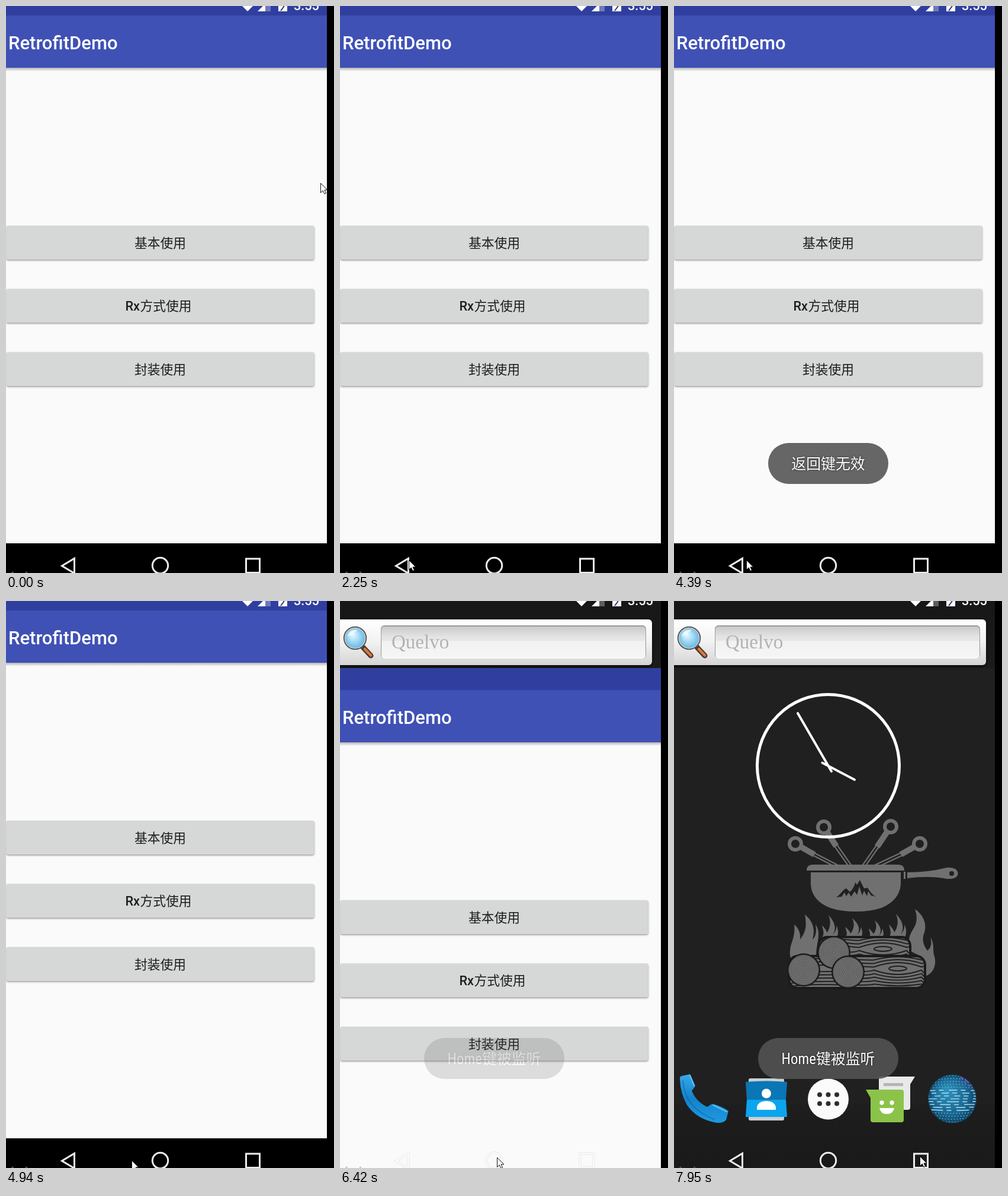
Animation of 554 by 955 pixels, one loop 8 s. Source, as an HTML page with a canvas:

```html
<!DOCTYPE html>
<html lang="zh">
<head>
<meta charset="utf-8">
<title>RetrofitDemo</title>
<style>
html, body { margin: 0; width: 100%; height: 100%; overflow: hidden; background: #000; }
canvas { display: block; }
</style>
</head>
<body>
<canvas id="stage" width="554" height="955"></canvas>
<script>
const stage = document.getElementById('stage').getContext('2d');
let ctx = stage;
const LOOP = 8000, W = 542, H = 955, MID = 260.5;
const ROBOTO = 'Roboto, "Noto Sans CJK SC", "Noto Sans CJK", sans-serif';
const CJK = '"Noto Sans CJK SC", "Noto Sans CJK", sans-serif';
const CONDENSED = '"Roboto Condensed", ' + ROBOTO;
const ART = '#707070', DARK = '#202020';

// Timelines hold [start ms, values...]; each value stays until the next one.
const CURSOR = [
  [0, 531, 298], [150, 514, 298], [300, 473, 448], [420, 415, 560], [550, 362, 661],
  [670, 292, 792], [820, 235, 880], [940, 177, 927], [1250, 163, 926], [1400, 146, 925],
  [1830, 136, 928], [1950, 130, 930], [2100, 117, 933], [2250, 116, 933], [4390, 122, 933],
  [4540, 140, 934], [4670, 162, 935], [4810, 190, 940], [4940, 212, 942], [5080, 230, 942],
  [5210, 248, 941], [5330, 261, 940], [5480, 265, 937], [7530, 330, 938], [7650, 398, 935],
  [7800, 414, 935], [7950, 415, 935]
];
const BACK_TOAST = [[0, 0], [2520, .2], [2640, .65], [2790, .92], [2940, 1],
  [4540, .85], [4670, .55], [4810, .2], [4940, 0]];
const HOME_TOAST = [[0, 0], [6420, .2], [6570, .69], [6720, .93], [6840, 1]];
const BACK_RIPPLE = [[0, 0], [2520, .14], [2640, .2], [2790, .08], [2940, 0]];
const HOME_RIPPLE = [[0, 0], [5880, .12], [6000, .2], [6150, .16], [6300, .06], [6420, 0]];
const APP_SHIFT = [[0, 0], [6300, 18], [6420, 134], [6570, H]];

const FLAME = new Path2D('M-50 0C-20 -25 -40 -40 -42 -58C-25 -45 -15 -35 -12 -28C8 -50 12 -75 -4 -100' +
  'C45 -65 40 -35 22 -20C38 -30 45 -42 45 -58C62 -30 50 -10 40 0Z');

function at(track, t) {
  let now = track[0];
  for (const key of track) if (key[0] <= t) now = key;
  return now.slice(1);
}

function rect(x, y, w, h, color) {
  ctx.fillStyle = color;
  ctx.fillRect(x, y, w, h);
}

function round(x, y, w, h, r, color) {
  ctx.fillStyle = color;
  ctx.beginPath();
  ctx.roundRect(x, y, w, h, r);
  ctx.fill();
}

function disc(x, y, r, color) {
  ctx.fillStyle = color;
  ctx.beginPath();
  ctx.arc(x, y, r, 0, 7);
  ctx.fill();
}

function ring(x, y, r, width, color) {
  ctx.strokeStyle = color;
  ctx.lineWidth = width;
  ctx.beginPath();
  ctx.arc(x, y, r, 0, 7);
  ctx.stroke();
}

function fill(d, color) {
  ctx.fillStyle = color;
  ctx.fill(new Path2D(d));
}

function stroke(d, width, color) {
  ctx.strokeStyle = color;
  ctx.lineWidth = width;
  ctx.stroke(new Path2D(d));
}

function text(str, x, y, font, color, align = 'left') {
  ctx.font = font;
  ctx.fillStyle = color;
  ctx.textAlign = align;
  ctx.fillText(str, x, y);
}

function fade(y0, y1, ...colors) {
  const g = ctx.createLinearGradient(0, y0, 0, y1);
  colors.forEach((c, i) => g.addColorStop(i / (colors.length - 1), c));
  return g;
}

function withShadow(color, blur, dy, draw) {
  ctx.save();
  ctx.shadowColor = color;
  ctx.shadowBlur = blur;
  ctx.shadowOffsetY = dy;
  draw();
  ctx.restore();
}

// Runs draw on its own canvas, so the result can be blended as one layer.
function layer(draw) {
  const canvas = document.createElement('canvas');
  canvas.width = 554;
  canvas.height = H;
  ctx = canvas.getContext('2d');
  draw();
  ctx = stage;
  return canvas;
}

function drawButton(y) {
  withShadow('rgba(0,0,0,.4)', 3, 1.5, () => round(.5, y, 520, 57, 3, '#d6d7d7'));
}

function drawApp(dy) {
  ctx.save();
  ctx.translate(0, dy);
  rect(0, 104, W, H, '#fafafa');
  rect(0, 104, W, 6, fade(104, 110, 'rgba(0,0,0,.28)', 'rgba(0,0,0,0)'));
  rect(0, -21, W, 38, '#303f9f');
  rect(0, 16, W, 88, '#3f51b5');
  text('RetrofitDemo', 4, 72.5, `500 31.1px ${ROBOTO}`, '#fff');
  for (let i = 0; i < 3; i++) drawButton(370 + i * 106.5);
  const font = `21.75px ${CJK}`, ink = '#1c1c1c';
  text('基本使用', MID, 407, font, ink, 'center');
  text('Rx', 201.5, 513, `500 21.75px ${ROBOTO}`, ink);
  text('方式使用', 226.5, 513, font, ink);
  text('封装使用', MID, 620, font, ink, 'center');
  ctx.restore();
}

function drawStatus() {
  fill('M399 0H417L408 9Z', '#fff');
  fill('M425 9L447 -13V9Z', 'rgba(255,255,255,.3)');
  fill('M425 9L438 -4V9Z', '#fff');
  rect(460, -10, 15, 19, '#fff');
  stroke('M464 8L470 0', 2, '#333a70');
  text('3:55', 486, 7, `500 21.75px ${ROBOTO}`, '#fff');
}

function drawNav(color, width) {
  ctx.lineJoin = 'miter';
  stroke('M94.5 943L115.5 930.5V955.5Z', width, color);
  ring(MID, 942.5, 13.2, width, color);
  stroke('M405.5 931H428.5V954.5H405.5Z', width, color);
}

function drawRipple(x, alpha) {
  if (alpha) round(x - 84, 909, 168, 68, 34, `rgba(255,255,255,${alpha})`);
}

function drawSearch() {
  withShadow('rgba(0,0,0,.8)', 5, 2, () =>
    round(-12, 31, 539, 77, 6, fade(31, 108, '#fff', '#f2f2f2', '#d4d4d4')));
  round(69, 41, 448, 56, 6, '#9c9c9c');
  round(70, 43, 446, 54, 5, fade(43, 97, '#c9c9c9', '#e4e4e4', '#e9e9e9', '#fafafa'));
  rect(71, 67, 444, 24, fade(67, 91, '#f1f1f1', '#f5f5f5'));
  text('Quelvo', 87, 80, '33px "Liberation Serif", serif', '#b3b3b3');
  ctx.lineCap = 'round';
  stroke('M38 77L52 92', 9, '#4b3a32');
  stroke('M42 81L52 91.5', 4.5, '#d9793c');
  const g = ctx.createRadialGradient(21, 56, 2, 25.5, 62.5, 19);
  g.addColorStop(0, '#e2f7ff');
  g.addColorStop(1, '#58b4e6');
  disc(25.5, 62.5, 17, g);
  ring(25.5, 62.5, 18, 3.5, '#55595c');
  ring(25.5, 62.5, 17, 1.5, '#d5dce0');
  fill('M13 59.5Q16 47.5 30 48.5Q22 56.5 13 59.5Z', 'rgba(255,255,255,.65)');
}

function drawClock() {
  ring(MID, 277.5, 120, 5, '#fff');
  ctx.lineCap = 'round';
  stroke('M266 287L209 189M250.5 272.5L305 301', 4, '#fff');
}

function drawSkewer(x, y, gx, gy, px, py) {
  ctx.lineCap = 'butt';
  const line = `M${gx} ${gy}L${px} ${py}`;
  stroke(line, 7, ART);
  stroke(line, 2.5, DARK);
  stroke(`M${x} ${y}L${gx} ${gy}`, 10, ART);
  disc(x, y, 13, ART);
  disc(x, y, 7, DARK);
}

function drawPot() {
  drawSkewer(205, 409, 237, 427, 276, 447);
  drawSkewer(253, 381, 274, 413, 298, 447);
  drawSkewer(366, 380, 343, 414, 320, 447);
  drawSkewer(415, 409, 383, 427, 340, 447);
  fill('M224 454Q224 444 234 444H379Q389 444 389 454Z', ART);
  fill('M231 457H383V478Q380 505 350 517Q332 523 307 523Q282 523 264 517Q233 505 231 478Z', ART);
  fill('M388 456H391V468H388ZM394 457Q430 457 461 449Q479 448 479.5 459Q479 469 461 468Q430 462 394 467Z', ART);
  disc(469, 459, 4, DARK);
  fill('M274 499C282 494 285 486 291 484L297 490Q304 484 306 474L309 478L314 470L321 484L327 483' +
    'Q333 494 341 498L333 496L328 489L326 497L321 488L318 496L313 481L309 495L305 489L299 498' +
    'L295 491L291 497L288 491L283 498Z', DARK);
}

function drawFlame(x, base, w, h) {
  ctx.save();
  ctx.translate(x, base);
  ctx.scale(w / 100, h / 100);
  ctx.fillStyle = ART;
  ctx.fill(FLAME);
  ctx.restore();
}

function drawLog(x, y, w, h, eyeX, eyeY) {
  round(x - 4, y - 4, w + 8, h + 8, 17, '#1b1b1b');
  ctx.save();
  ctx.beginPath();
  ctx.roundRect(x, y, w, h, 13);
  ctx.clip();
  rect(x, y, w, h, ART);
  ctx.strokeStyle = DARK;
  ctx.lineWidth = 2;
  for (let i = -5; i <= 5; i++) {
    if (!i) continue;
    const v = eyeY + i * 5.5, bulge = Math.sign(i) * (8 - Math.abs(i));
    ctx.beginPath();
    ctx.moveTo(x, v + 3);
    ctx.bezierCurveTo(x + w * .25, v - 5, eyeX - 55, v + 4, eyeX - 40, v - bulge * .4);
    ctx.bezierCurveTo(eyeX - 12, v + bulge, eyeX + 12, v + bulge, eyeX + 40, v - bulge * .4);
    ctx.lineTo(x + w, v + 2);
    ctx.stroke();
  }
  ctx.beginPath();
  ctx.ellipse(eyeX, eyeY, 15, 4, 0, 0, 7);
  ctx.stroke();
  ctx.restore();
}

function drawLogEnd(x, y) {
  disc(x, y, 28, '#1b1b1b');
  disc(x, y, 25.5, ART);
  for (let r = 3; r < 25; r += 3) ring(x, y, r, .9, '#555');
}

function drawFire() {
  fill('M197 602C192 578 206 572 203 545C212 552 214 562 213 570C224 556 224 545 221 528' +
    'C237 541 238 556 234 570C240 565 241 556 239 545C250 560 240 575 240 600Z', ART);
  fill('M400 590C393 572 399 560 405 551C411 541 411 531 407 519C423 530 427 546 423 558' +
    'C418 570 421 579 428 589C434 584 436 577 433 567C440 575 437 588 439 596' +
    'C445 612 438 628 424 632L420 600Z', ART);
  drawFlame(262, 570, 28, 41);
  drawFlame(302, 570, 30, 36);
  drawFlame(340, 570, 26, 32);
  drawFlame(376, 570, 30, 43);
  drawLog(246, 568, 151, 42, 353, 586);
  drawLog(196, 600, 226, 50, 378, 619);
  drawLogEnd(270, 592);
  drawLogEnd(219, 621.5);
  drawLogEnd(294, 625);
}

function drawPhone() {
  fill('M10 806Q9 801 13 800L27 797L36 817L30 825Q37 843 56 852L64 847Q78 849 92 859L88 874' +
    'Q82 881 68 878Q38 872 22 849Q11 830 10 806Z', fade(797, 880, '#35a9ea', '#1382cb', '#209be2'));
  stroke('M15 808Q18 854 68 873', 2, 'rgba(8,90,150,.45)');
  stroke('M27 799L34 816M66 849L89 860', 2, '#62c3f5');
}

function drawContacts() {
  round(126, 804, 60, 71, 3, '#c9ced1');
  fill('M121 810Q156 807 191 810L189 840H123Z', '#0a76b5');
  fill('M123 840H189L191 869H121Z', '#0ba5ee');
  disc(156, 829.5, 8, '#fff');
  fill('M140 857V852Q143 842 156 842Q169 842 172 852V857Z', '#fff');
}

function drawDrawer() {
  disc(MID, 839, 34.5, '#fafafa');
  for (let i = 0; i < 6; i++) disc(246 + i % 3 * 14.5, 831.5 + (i > 2) * 15, 4, '#2c2c2c');
}

function drawMessages() {
  fill('M349 801H407L399 814V853Q399 857 395 857H349Q346 857 346 853V804Q346 801 349 801Z', '#e9e9e9');
  rect(354, 812, 33, 5, '#b5b5b5');
  fill('M324 823H384Q388 823 388 827V874Q388 878 384 878H336Q332 878 332 874V837Z', '#8bc34a');
  disc(351, 845, 3.7, '#fff');
  disc(368, 845, 3.7, '#fff');
  fill('M347 854H372Q370 864 359.5 864Q349 864 347 854Z', '#fff');
}

function drawGlobe() {
  const x = 470, y = 838.5, r = 41;
  const g = ctx.createRadialGradient(460, 824, 4, x, y, r);
  g.addColorStop(0, '#2d8fbb');
  g.addColorStop(.7, '#1a6690');
  g.addColorStop(1, '#104463');
  disc(x, y, r, g);
  ctx.save();
  ctx.beginPath();
  ctx.arc(x, y, r - 1, 0, 7);
  ctx.clip();
  ctx.lineCap = 'butt';
  for (let i = -8; i <= 8; i++) {
    const v = y + i * 4.6, half = Math.sqrt(Math.max(0, r * r - (v - y) ** 2));
    const bright = i > -4 && i < 5;
    ctx.setLineDash(bright ? [15 + i * 5 % 7, 6, 8, 9] : [2, 3]);
    ctx.lineDashOffset = i * 11;
    stroke(`M${x - half} ${v}Q${x} ${v + i * .6} ${x + half} ${v}`, 1.7, bright ? '#9ad3ea' : '#4fa6cc');
  }
  ctx.setLineDash([5, 4]);
  stroke('M482 801L500 811M488 808L504 820', 2, '#9a48c8');
  ctx.restore();
}

function drawHome() {
  rect(0, 0, W, H, DARK);
  rect(0, 0, W, 113, fade(0, 113, '#171717', '#1b1b1b'));
  rect(0, 848, W, 107, fade(848, H, '#1e1e1e', '#191919'));
  drawSearch();
  drawPot();
  drawFire();
  drawClock();
  drawPhone();
  drawContacts();
  drawDrawer();
  drawMessages();
  drawGlobe();
}

function drawToast(str, x, w) {
  round(x, 736, w, 69, 34.5, 'rgba(84,84,84,.89)');
  withShadow('rgba(0,0,0,.7)', 3, 0, () =>
    text(str, MID, 780, `condensed 24.9px ${CONDENSED}`, '#fff', 'center'));
}

function blend(image, alpha) {
  ctx.globalAlpha = alpha;
  ctx.drawImage(image, 0, 0);
  ctx.globalAlpha = 1;
}

function drawPager() {
  disc(251, 764, 5, '#e8e8e8');
  fill('M263 763H268V760L274 764.5L268 769V766H263Z', '#f4f4f4');
}

function drawCursor(x, y) {
  ctx.save();
  ctx.translate(x + .5, y + .5);
  ctx.lineJoin = 'miter';
  const d = 'M0 0V16L3.8 12.4L6.4 18L9 17L6.5 11.4H11.4Z';
  fill(d, '#fff');
  stroke(d, 1, '#111');
  ctx.restore();
}

const backToast = layer(() => drawToast('返回键无效', 159, 203));
const homeToast = layer(() => drawToast('Home键被监听', 142, 237));
const home = layer(drawHome);

function draw(t) {
  const [shift] = at(APP_SHIFT, t);
  const sliding = shift > 0 && shift < H;
  rect(0, 0, 554, H, '#000');
  ctx.save();
  ctx.beginPath();
  ctx.rect(0, 0, W, H);
  ctx.clip();
  if (shift) blend(home, 1);
  if (shift < H) drawApp(shift);
  if (!shift) rect(0, 905, W, 50, '#000');
  drawStatus();
  drawRipple(104, at(BACK_RIPPLE, t)[0]);
  drawRipple(MID, at(HOME_RIPPLE, t)[0]);
  if (sliding) {
    drawNav('#dedede', 3.6);
    drawNav('#fff', 2.2);
  } else {
    drawNav('#eee', 3);
  }
  for (const x of [11, 34.5]) disc(x, 954.5, 2, sliding ? '#ccc' : '#484848');
  blend(backToast, at(BACK_TOAST, t)[0]);
  blend(homeToast, at(HOME_TOAST, t)[0]);
  if (t >= 6570 && t < 6720) drawPager();
  ctx.restore();
  drawCursor(...at(CURSOR, t));
}

const start = performance.now();
function tick() {
  draw((performance.now() - start) % LOOP);
  requestAnimationFrame(tick);
}
tick();
</script>
</body>
</html>
```
